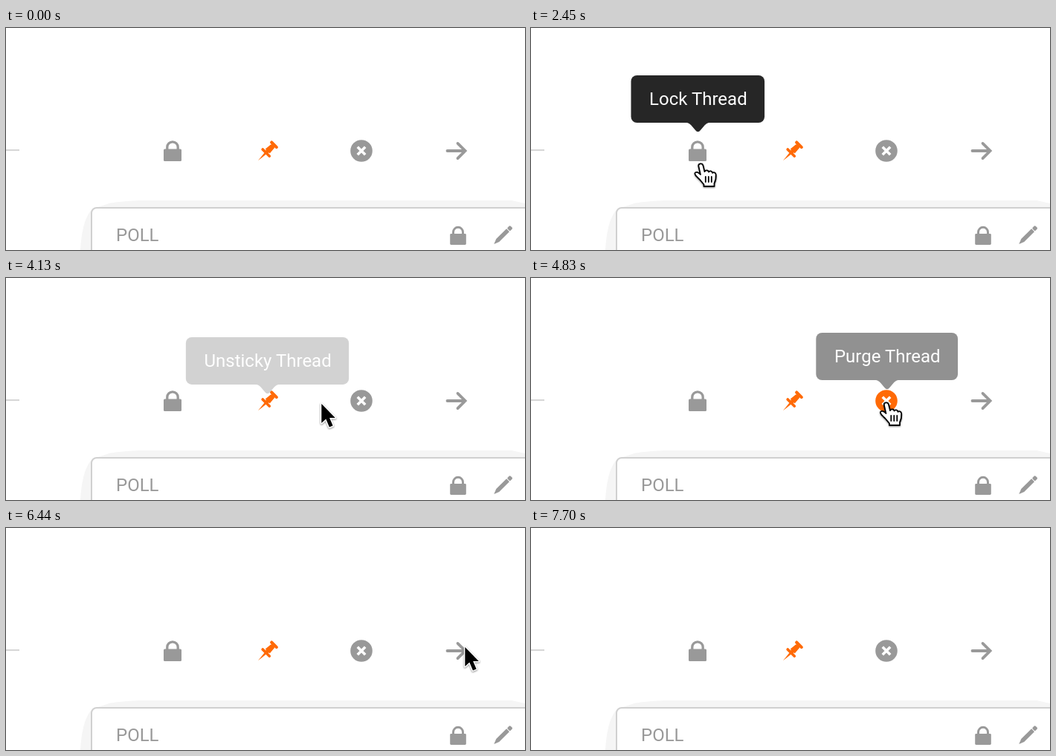
Animation of 698x300 px, one loop 8750 ms. Source, as an HTML page:

```html
<!DOCTYPE html>
<html lang="en">
<head>
<meta charset="utf-8">
<title>Thread tools</title>
<style>
  html, body { margin: 0; width: 100%; height: 100%; overflow: hidden; background: #fff; }
  svg { display: block; width: 698px; height: 300px; }
  text { font: 24px Roboto, Arial, sans-serif; }
  .icon { color: #999; fill: currentColor; }
  .icon.hot { color: #ff6a06; }
  .line { fill: none; stroke: currentColor; }
  .tip { fill: #262626; opacity: 0; }
  .tip text { fill: #fff; text-anchor: middle; }
  #cursor { filter: drop-shadow(0 1.5px 1px rgba(0, 0, 0, .45)); stroke-linejoin: round; }
</style>
</head>
<body>
<svg viewBox="0 0 698 300">
  <defs>
    <g id="lock">
      <rect x="-12" y="-2.5" width="24" height="16.5" rx="1.5"/>
      <path class="line" stroke-width="3.3" d="M-7.2 -2V-5A7.2 7.2 0 0 1 7.2 -5V-2"/>
    </g>
  </defs>

  <path fill="#d6d6d6" d="M0 164H18V166H0Z"/>
  <path fill="#f5f5f5" d="M100 300C102 268 108 252 117 244L136 238Q140 235 180 233H680L698 237V300Z"/>
  <rect x="115" y="243" width="700" height="100" rx="7" fill="#fff" stroke="#d0d0d0" stroke-width="2"/>
  <text x="148" y="288" fill="#999">POLL</text>
  <use class="icon" href="#lock" transform="translate(608 280.3) scale(.9)"/>
  <g class="icon" transform="translate(656.3 292) rotate(45)">
    <path d="M0 0L-2.8 -7V-26.5H2.8V-7Z"/>
    <rect x="-2.8" y="-33" width="5.6" height="5.5" rx="1.5"/>
  </g>

  <use class="icon tool" href="#lock" x="224" y="166"/>
  <g class="icon tool" transform="translate(339 179.3) rotate(45)">
    <path d="M0 0L-1.5 -14H1.5Z"/>
    <rect x="-8.2" y="-17" width="16.4" height="3.6" rx="1.6"/>
    <path d="M-2.5 -16.5V-18H-4.2L-3.4 -27.5H3.4L4.2 -18H2.5V-16.5Z"/>
    <rect x="-6.7" y="-32.5" width="13.4" height="4.2" rx="2"/>
    <rect x="-3" y="-29" width="6" height="3"/>
  </g>
  <g class="icon tool">
    <circle cx="478" cy="166" r="14.8"/>
    <path stroke="#fff" stroke-width="3.6" d="M472.8 160.8L483.2 171.2M483.2 160.8L472.8 171.2"/>
  </g>
  <g class="icon tool">
    <path class="line" stroke-width="3.8" stroke-linecap="round" d="M593.5 166H617.5M607.5 155.9L617.6 166L607.5 176.1"/>
  </g>

  <g id="tips"></g>

  <g id="cursor">
    <path id="pointer" stroke="#fff" stroke-width="3" paint-order="stroke"
      d="M0 0V26L6 20.5L10.6 31.5L15.3 29.5L10.8 19H18.5Z"/>
    <g id="hand" fill="#fff" stroke="#000" stroke-width="1.8" stroke-linecap="round">
      <path d="M-3.2 3.5C-3.6 -.2 2 -1 3 3L5 11.2C6 8.8 10 8.8 10.5 11.6C11.5 9.6 15 10 15.5 12.8C17 11.5 19.8 12 20.2 15C20.6 20 19.5 24 18 27V31H4V28.5C1 25 -1 22 -4 19.5C-7 16.5 -8.8 15 -8 13C-7 10.8 -3.5 11.8 -.6 15Z"/>
      <path d="M6.3 18V25M10.3 18V25M14.3 18V25"/>
    </g>
  </g>
</svg>

<script>
const LOOP = 8750, STEP = 70, END = 7700;

// Hover span of each tool, and where the cursor rests on it
const tools = [
  { label: 'Lock Thread',     enter: 1540, leave: 2450, x: 228.5, y: 183 },
  { label: 'Unsticky Thread', enter: 2940, leave: 3780, x: 348, y: 173, sticky: true },
  { label: 'Purge Thread',    enter: 4760, leave: 5600, x: 478, y: 168 },
  { label: 'Move Thread',     enter: 6510, leave: 7350, x: 617, y: 161 }
];

// The cursor comes in from the left and overshoots the last tool
const entry = { enter: 0, leave: 560, x: -22, y: 192 };
const overshoot = { enter: 5950, leave: 5950, x: 638, y: 160 };
const stops = [entry, ...tools.slice(0, 3), overshoot, tools[3]];

const $ = id => document.getElementById(id);
const icons = document.querySelectorAll('.tool');
const clamp = v => Math.max(0, Math.min(1, v));
const easeOut = u => 1 - (1 - u) ** 2;

const tips = tools.map(({ label }, i) => {
  const tip = document.createElementNS('http://www.w3.org/2000/svg', 'g');
  const x = 224.3 + 127.2 * i;
  tip.setAttribute('class', 'tip');
  tip.innerHTML = `<rect y="64" height="64" rx="8"/>
    <path transform="translate(${x + .2} 128)" d="M-17 -.5Q-12 0 -9 3.5L-3.5 10Q0 14.5 3.5 10L9 3.5Q12 0 17 -.5Z"/>
    <text x="${x + .6}" y="104">${label}</text>`;
  $('tips').append(tip);
  const box = tip.firstChild, width = tip.lastChild.getComputedTextLength() + 48;
  box.setAttribute('x', x - width / 2);
  box.setAttribute('width', width);
  return tip;
});

function cursorAt(t) {
  const i = stops.findLastIndex(s => t >= s.enter);
  const from = stops[i], to = stops[i + 1] || from;
  const k = t > from.leave && to !== from
    ? easeOut((t - from.leave) / (to.enter - from.leave)) : 0;
  return [from.x + (to.x - from.x) * k, from.y + (to.y - from.y) * k];
}

// Fades in at once, fades out shortly after the cursor has left
function tipAlpha({ enter, leave }, t) {
  if (t >= END) return 0;
  const gone = t - leave;
  return gone > 2 * STEP ? clamp(1 - (gone - 117) / 292) : clamp((t - enter + STEP) / 280);
}

function draw(now) {
  const t = Math.floor(now % LOOP / STEP) * STEP;
  tools.forEach((tool, i) => {
    const alpha = tipAlpha(tool, t);
    tips[i].style.opacity = alpha;
    tips[i].setAttribute('transform', `translate(0 ${20 * (1 - alpha)})`);
    icons[i].classList.toggle('hot', !!tool.sticky || t >= tool.enter && t < tool.leave);
  });
  const hand = tools.some(tool => t >= tool.enter && t <= tool.leave);
  $('cursor').setAttribute('transform', `translate(${cursorAt(t)})`);
  $('cursor').style.display = t > entry.leave && t <= tools[3].leave ? '' : 'none';
  $('hand').style.display = hand ? '' : 'none';
  $('pointer').style.display = hand ? 'none' : '';
}

const start = performance.now();
function tick() {
  draw(performance.now() - start);
  requestAnimationFrame(tick);
}
tick();
</script>
</body>
</html>
```
